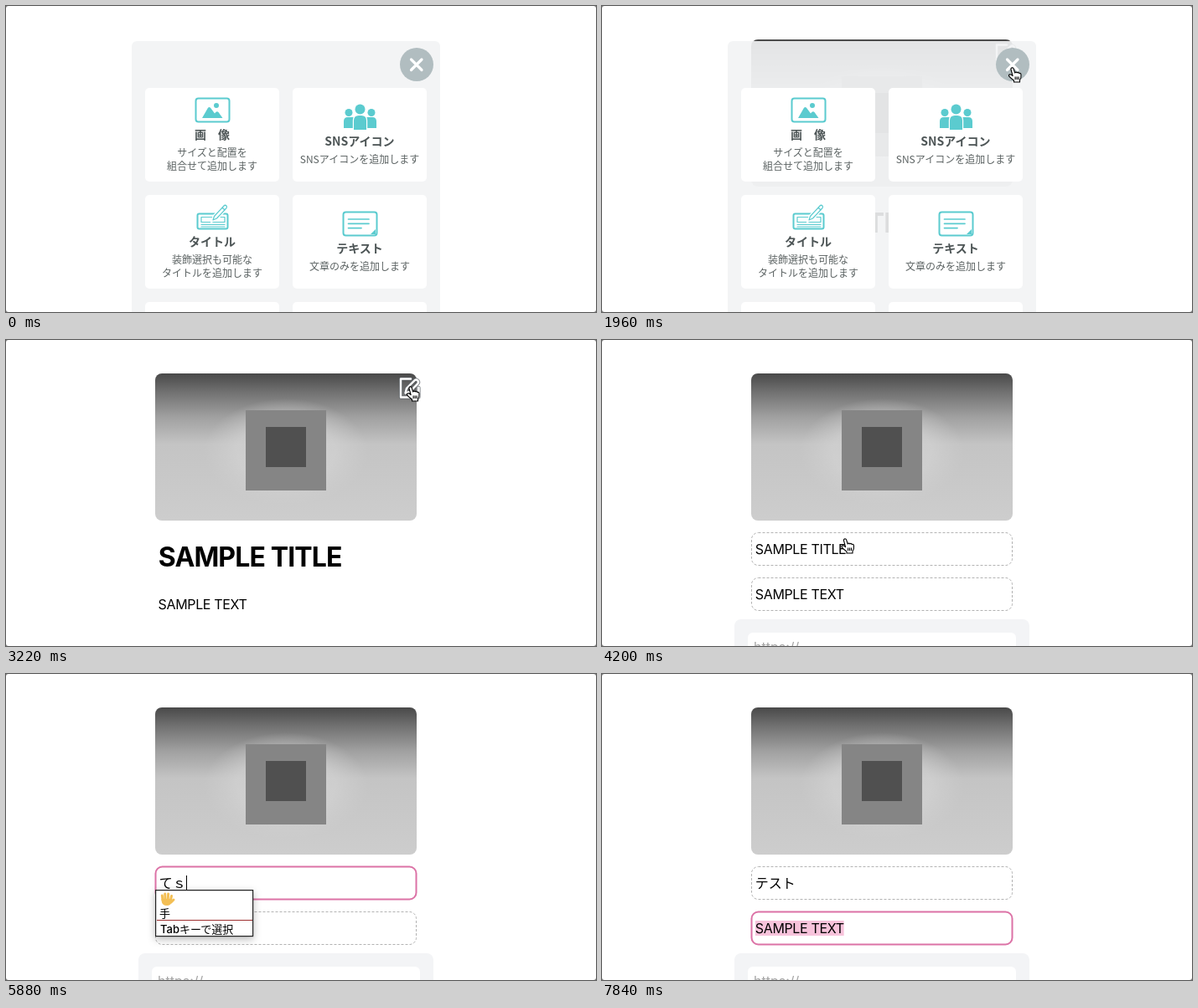
An HTML page for the animation above (8000 ms loop, 704x366 px).

```html
<!DOCTYPE html>
<html lang="ja">
<head>
<meta charset="utf-8">
<title>Block editor</title>
<style>
  html, body { margin: 0; width: 100%; height: 100%; overflow: hidden; background: #777; }
  svg { display: block; width: 704px; height: 366px; }
  text { font-family: Inter, "Noto Sans CJK JP", "Noto Sans CJK", sans-serif; font-size: 16px; white-space: pre; }
  .jp, .jp text { font-family: "Noto Sans CJK JP", "Noto Sans CJK", sans-serif; }
  .menu text { font-size: 12px; fill: #5c6363; text-anchor: middle; }
  .menu .name { font-size: 14px; font-weight: 700; fill: #4d5556; }
  .heading { font-size: 32px; font-weight: 700; letter-spacing: -.88px; }
  .body { letter-spacing: -.35px; }
  .line { fill: none; stroke: #5bcbcf; stroke-width: 2; stroke-linecap: round; stroke-linejoin: round; }
  .thin { stroke-width: 1.2; }
  .solid { fill: #5bcbcf; }
  .popup text { font-size: 13px; font-weight: 500; }
</style>
</head>
<body>
<svg viewBox="0 0 704 366">
  <defs>
    <linearGradient id="shade" x2="0" y2="1">
      <stop offset="0" stop-color="#494949"/>
      <stop offset=".13" stop-color="#727272"/>
      <stop offset=".3" stop-color="#a1a1a1"/>
      <stop offset=".48" stop-color="#c4c4c4"/>
      <stop offset="1" stop-color="#cdcdcd"/>
    </linearGradient>
    <radialGradient id="halo">
      <stop offset=".6" stop-color="#d4d4d4" stop-opacity=".6"/>
      <stop offset="1" stop-color="#d0d0d0" stop-opacity="0"/>
    </radialGradient>
    <filter id="soft" x="-20%" y="-20%" width="140%" height="150%">
      <feDropShadow dx="0" dy="3" stdDeviation="5" flood-opacity=".28"/>
    </filter>
    <g id="pen" fill="none" stroke-linejoin="round" stroke-linecap="round">
      <path d="M483 46.5H471V68.5H492.5V57"/>
      <path d="M476.5 63.5L478 57.8L487.5 48.3Q489.3 46.6 491.2 48.4Q493 50.4 491.4 52.2L482 61.8Z"/>
    </g>
  </defs>

  <rect width="704" height="366" rx="3" fill="#fff"/>

  <g id="block">
    <rect x="178" y="40" width="312" height="176" rx="8" fill="url(#shade)"/>
    <ellipse cx="334" cy="134" rx="98" ry="64" fill="url(#halo)"/>
    <rect x="286" y="84" width="96" height="96" fill="#858585"/>
    <rect id="play" x="310" y="104" width="48" height="48"/>
    <g id="view">
      <use href="#pen" stroke="#5d6369" stroke-opacity=".8" stroke-width="4.2"/>
      <use href="#pen" stroke="#fff" stroke-width="2.4"/>
      <circle id="ripple" cx="482.5" cy="55.5" r="31" fill="#000" fill-opacity=".12"/>
      <text class="heading" x="181.8" y="270.5">SAMPLE TITLE</text>
      <text class="body" x="181.6" y="322">SAMPLE TEXT</text>
    </g>
  </g>

  <g id="edit">
    <rect id="box1" x="178.5" y="230.5" width="311" height="39" rx="8" fill="#fff"/>
    <rect id="box2" x="178.5" y="284.5" width="311" height="39" rx="8" fill="#fff"/>
    <rect id="mark1" y="241" height="18" fill="#f7c3db"/>
    <rect id="mark2" y="295" height="18" fill="#f7c3db"/>
    <text id="field1" class="body" x="182.8" y="256"></text>
    <text id="field2" class="body" x="182.8" y="310">SAMPLE TEXT</text>
    <rect id="caret" y="241" width="1" height="18"/>
    <rect x="158" y="334" width="352" height="50" rx="8" fill="#f3f4f6"/>
    <rect x="174" y="350" width="320" height="40" rx="6" fill="#fff"/>
    <text x="181" y="373" fill="#a6a6a6">https://</text>
  </g>

  <g id="short" class="popup">
    <rect x="178.6" y="258.6" width="116" height="55" fill="#fff" stroke="#222" stroke-width="1.2" filter="url(#soft)"/>
    <g fill="none" stroke="#f3bf55" stroke-width="3" stroke-linecap="round">
      <path d="M187 270L186.3 265M190 269L189.7 263M193.3 269L193.6 263M196.5 270L197.5 265.5M197 273L200 270"/>
    </g>
    <path d="M185.5 269H198V272Q197 277 192 277Q186 277 185.5 271Z" fill="#f3bf55"/>
    <text x="183" y="291">手</text>
    <path d="M180 294.5H294" stroke="#9d2f2f"/>
    <text x="184" y="310">Tabキーで選択</text>
  </g>
  <g id="long" class="popup">
    <rect x="178.6" y="258.6" width="144" height="74" fill="#fff" stroke="#222" stroke-width="1.2" filter="url(#soft)"/>
    <text x="183" y="274">テスト</text>
    <text id="option" x="183" y="291"></text>
    <text x="183" y="308">テストする</text>
    <path d="M180 313.5H322" stroke="#9d2f2f"/>
    <text x="184" y="328">Tabキーで選択</text>
  </g>

  <g id="menu" class="menu jp">
    <rect x="150" y="42" width="368" height="340" rx="6" fill="#f2f3f5" fill-opacity=".91"/>
    <g id="cards" fill="#fff"></g>
    <circle cx="490" cy="70" r="20" fill="#b1bdc0"/>
    <path d="M483.5 64L496 76.5M496 64L483.5 76.5" stroke="#fff" stroke-width="3.2" stroke-linecap="round"/>

    <rect class="line" x="226.5" y="110.5" width="40" height="28" rx="3"/>
    <path class="solid" d="M234 134L241 121.8Q242.5 120 244 121.8L249 128.5Q251.5 125 253.5 127L258.5 134Z"/>
    <circle class="solid" cx="251" cy="119" r="3"/>

    <g class="solid">
      <circle cx="409" cy="127.5" r="4.5"/><circle cx="436" cy="127.5" r="4.5"/>
      <path d="M403 146V138Q403 133 408 133H437Q442 133 442 138V146Z"/>
      <path d="M415 148V137Q415 131 421 131H424Q430 131 430 137V148Z" stroke="#fff" stroke-width="2.4" paint-order="stroke"/>
      <circle cx="422.5" cy="123.5" r="6"/>
    </g>

    <rect class="line" x="228.5" y="248.5" width="36" height="18" rx="2"/>
    <path class="line thin" d="M233 252.5H261V258.5H233ZM233 261.5H261M233 264H261"/>
    <path d="M247 256L248.5 251.5L260 239Q261.5 237.5 263 239Q264 240.5 262.7 242L251.5 254Z"
      fill="#fff" stroke="#fff" stroke-width="4"/>
    <path class="line thin" d="M247 256L248.5 251.5L260 239Q261.5 237.5 263 239Q264 240.5 262.7 242L251.5 254ZM258 241L261 244"/>

    <rect class="line" x="402.5" y="246.5" width="40" height="28" rx="3"/>
    <path class="line" style="stroke-width:1.7" d="M408.5 255H433M408.5 260.3H433M408.5 265.6H424"/>
    <path class="solid" d="M441 267V273H435Z"/>

    <text class="name" x="246" y="159">画　像</text>
    <text x="246" y="179.5">サイズと配置を</text>
    <text x="246" y="195.5">組合せて追加します</text>
    <text class="name" x="422" y="166.5">SNSアイコン</text>
    <text x="422" y="187.5">SNSアイコンを追加します</text>
    <text class="name" x="246" y="287">タイトル</text>
    <text x="246" y="307.5">装飾選択も可能な</text>
    <text x="246" y="323.5">タイトルを追加します</text>
    <text class="name" x="422" y="295">テキスト</text>
    <text x="422" y="315.5">文章のみを追加します</text>
  </g>

  <g id="cursor">
    <path id="arrow" d="M0 0V16L3.8 12.4L6.4 18L9 16.9L6.6 11.4H11.5Z" stroke="#fff"/>
    <g id="hand" transform="translate(-4.5 -1)" fill="#fff" stroke="#000" stroke-width="1.1" stroke-linejoin="round">
      <path d="M5.6 10.6L3.5 3Q3.3 .9 5 .8Q6.4 .9 6.8 2.5L8.2 7Q9.6 5.4 10.8 6.8Q12.2 5.7 13.1 7.4Q15.2 6.7 15.5 9.2Q15.9 13 14 15.6V18H7V16Q4 14 1.1 10.8Q.6 8.9 2.4 8.8Q4 9 5.6 10.6Z"/>
      <path d="M8.6 11.5V15M10.6 11.5V15M12.6 11.5V15" fill="none"/>
    </g>
    <path id="beam" d="M-3 -8.5Q0 -8.5 0 -6V6Q0 8.5 -3 8.5M3 -8.5Q0 -8.5 0 -6M0 6Q0 8.5 3 8.5M-2 3H2" fill="none" stroke="#222" stroke-width="1.1"/>
  </g>
</svg>
<script>
const LOOP = 8000, STEP = 70, TEXT_X = 182.8;
const $ = id => document.getElementById(id);
const set = (id, attrs) => { for (const k in attrs) $(id).setAttribute(k, attrs[k]); };
const show = (id, on) => { $(id).style.display = on ? "" : "none"; };
const clamp = v => Math.max(0, Math.min(1, v));
const within = (t, a, b) => t >= a && t < b;
const lastAt = (list, t) => list.filter(item => item[0] <= t).pop();

// time, x, y, pointer shape from here on
const path = [
  [1260, 520, 313, "arrow"], [1680, 498, 130, "hand"], [1960, 489, 74, "hand"],
  [2100, 488, 71, "hand"], [2240, 484, 76, "hand"], [2520, 328, 228, "arrow"],
  [2590, 318.5, 241, "arrow"], [2660, 318, 246, "arrow"], [2730, 332, 225, "hand"],
  [3010, 476, 70, "hand"], [3220, 482, 56, "hand"], [3570, 482, 56, "hand"],
  [4200, 289.5, 238, "hand"], [4410, 292, 246, "beam"], [4550, 292, 246, "beam"],
  [4830, 230, 216, "beam"], [5040, 182, 244, "beam"], [5670, 182, 244, "beam"]
];

// time, field content, popup, second option
const typing = [
  [0, "SAMPLE TITLE"], [5670, "ｔ"], [5740, "ｔ", "short"], [5810, "て", "short"],
  [5880, "てｓ", "short"], [7140, "てす", "long", "手数料"], [7280, "てすｔ", "long", "手数料"],
  [7420, "てすと", "long", "てすと"], [7560, "テスト", "long", "てすと"], [7630, "テスト"]
];

const hovers = [[2060, 2500], [2730, 3060], [3640, 4040]];

for (const x of [166, 342]) for (const y of [98, 226, 354])
  $("cards").innerHTML += `<rect x="${x}" y="${y}" width="160" height="112" rx="5"/>`;

function drawCursor(t) {
  const i = path.findLastIndex(p => p[0] <= t);
  const on = i >= 0 && i < path.length - 1;
  show("cursor", on);
  if (!on) return 0;
  const [t0, x0, y0, shape] = path[i], [t1, x1, y1] = path[i + 1];
  const k = clamp((t - t0) / (t1 - t0)), e = k * k * (3 - 2 * k);
  const x = x0 + (x1 - x0) * e, y = y0 + (y1 - y0) * e;
  set("cursor", { transform: `translate(${x} ${y})` });
  for (const s of ["arrow", "hand", "beam"]) show(s, s === shape);
  return x;
}

function drawBox(id, focused) {
  set(id, focused
    ? { stroke: "#dc72a6", "stroke-width": 2, "stroke-dasharray": "none" }
    : { stroke: "#b3b3b3", "stroke-width": 1, "stroke-dasharray": "3 2" });
}

function drawMark(id, field, from, on) {
  show(id, on);
  if (on) set(id, { x: from, width: Math.max(0, TEXT_X + $(field).getComputedTextLength() - from) });
}

function draw(t) {
  const editing = t >= 3570, second = t >= 7840;
  show("menu", t < 2030);
  show("view", !editing);
  show("edit", editing);
  show("ripple", within(t, 3430, 3570));
  $("block").style.opacity = clamp((t - 840) / 210);

  const heat = Math.max(...hovers.map(([a, b]) => Math.min(clamp((t - a) / 140), 1 - clamp((t - b) / 140))));
  const dim = 80 * (1 - heat);
  set("play", { fill: `rgb(${80 + 175 * heat},${dim},${dim})` });

  const x = drawCursor(t);
  const [since, text, popup, option] = lastAt(typing, t);
  $("field1").textContent = text;
  $("field1").setAttribute("class", since ? "jp" : "body");
  $("option").textContent = option || "";
  show("short", popup === "short");
  show("long", popup === "long");

  drawBox("box1", within(t, 4550, 7840));
  drawBox("box2", second);
  drawMark("mark1", "field1", Math.max(TEXT_X, x), within(t, 4550, 5670));
  drawMark("mark2", "field2", TEXT_X, second);
  show("caret", within(t, 5670, 7840) && !within(t, 6370, 6860));
  set("caret", { x: 183 + 16 * text.length });
}

function tick(now) {
  draw(Math.floor((now % LOOP) / STEP) * STEP);
  requestAnimationFrame(tick);
}
draw(0);
requestAnimationFrame(tick);
</script>
</body>
</html>
```
